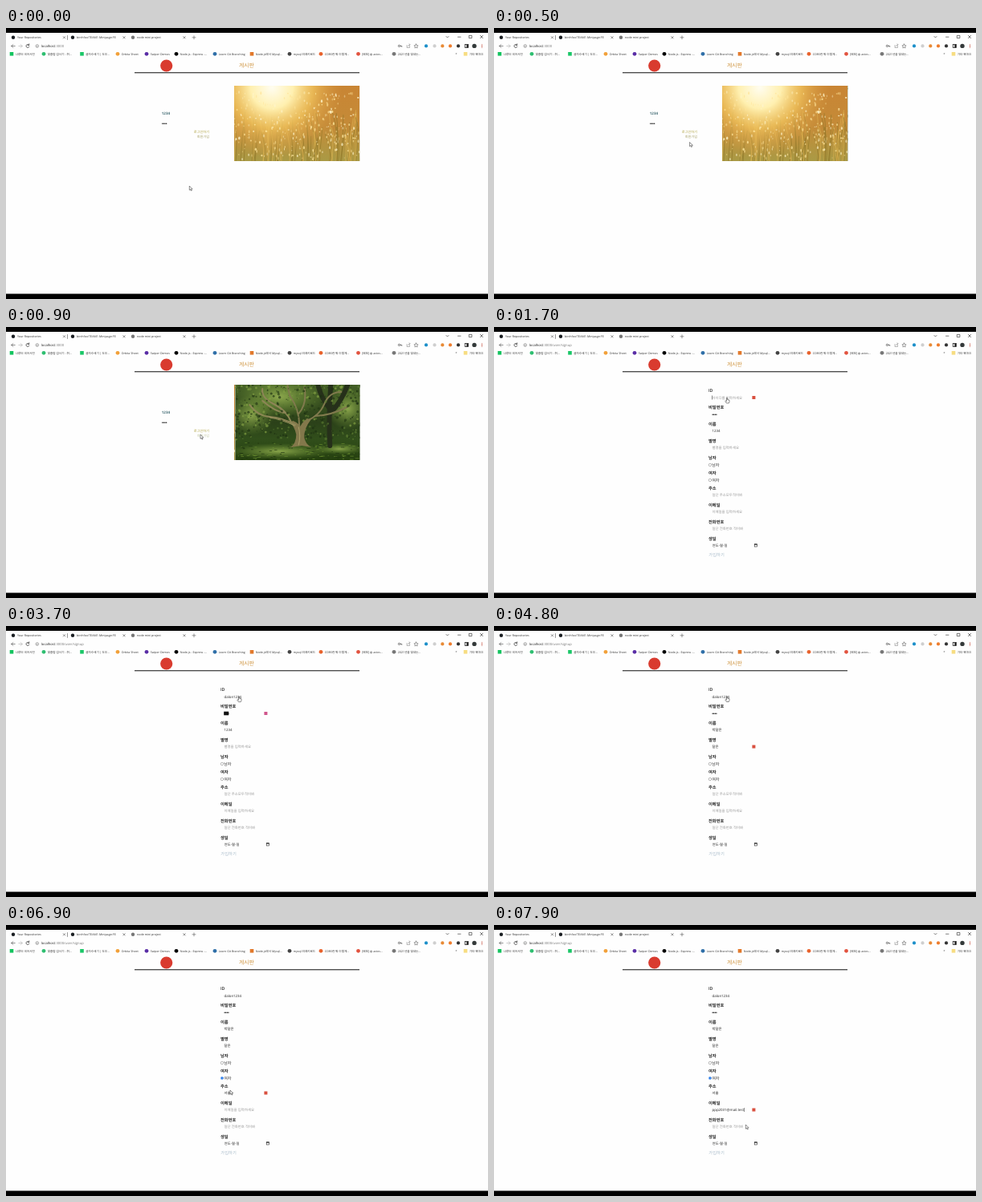
Write an HTML page that moves like this. It is 600 by 338 pixels and loops after 8000 ms.

```html
<!DOCTYPE html>
<html lang="ko">
<head>
<meta charset="utf-8">
<title>Signup demo</title>
<style>
html, body { margin: 0; width: 100%; height: 100%; overflow: hidden; background: #fefefe; }
svg { display: block; width: 100vw; height: 100vh; }
text {
  font-family: "Open Sans", "Noto Sans CJK KR", "Noto Sans CJK", sans-serif;
  text-rendering: geometricPrecision; white-space: pre;
}
</style>
</head>
<body>
<svg id="stage" viewBox="0 0 600 338">
  <defs>
    <clipPath id="frame"><rect x="284" y="72" width="156.5" height="94"/></clipPath>
    <clipPath id="slideClip"><rect width="156.5" height="94"/></clipPath>
    <linearGradient id="field" x2="0" y2="1">
      <stop offset="0" stop-color="#c98534"/><stop offset=".55" stop-color="#c48b38"/>
      <stop offset="1" stop-color="#a99a45"/>
    </linearGradient>
    <radialGradient id="sun" gradientUnits="userSpaceOnUse" cx="47" cy="2" r="88">
      <stop offset="0" stop-color="#fffdf0"/><stop offset=".3" stop-color="#fff0b0"/>
      <stop offset=".58" stop-color="#f4c860" stop-opacity=".75"/>
      <stop offset="1" stop-color="#d89840" stop-opacity="0"/>
    </radialGradient>
    <linearGradient id="forest" x2="0" y2="1">
      <stop offset="0" stop-color="#435e25"/><stop offset=".5" stop-color="#2b4119"/>
      <stop offset=".72" stop-color="#314e1b"/><stop offset="1" stop-color="#25400f"/>
    </linearGradient>
    <radialGradient id="glow">
      <stop offset="0" stop-color="#a8c45c" stop-opacity=".75"/>
      <stop offset="1" stop-color="#7ba03c" stop-opacity="0"/>
    </radialGradient>
  </defs>
</svg>
<script>
const stage = document.getElementById('stage');
const LOOP = 8000;

function add(parent, tag, attrs = {}, content) {
  const node = document.createElementNS(stage.namespaceURI, tag);
  for (const key in attrs) node.setAttribute(key, attrs[key]);
  if (content !== undefined) node.textContent = content;
  parent.append(node);
  return node;
}
const rect = (p, x, y, width, height, fill) => add(p, 'rect', { x, y, width, height, fill });
const dot = (p, cx, cy, r, fill, opacity = 1) => add(p, 'circle', { cx, cy, r, fill, opacity });
const line = (p, d, stroke, width = 0.6) =>
  add(p, 'path', { d, stroke, 'stroke-width': width, fill: 'none', 'stroke-linecap': 'round' });
// y is the vertical middle of the line of text
const label = (p, x, y, size, str, fill = '#222', weight = 400) =>
  add(p, 'text', { x, y: y + size * 0.36, 'font-size': size, fill, 'font-weight': weight }, str);
const show = (node, on) => node.setAttribute('visibility', on ? 'visible' : 'hidden');

function random(seed) {
  return () => (seed = (seed * 16807) % 2147483647) / 2147483647;
}
function at(steps, t) {
  let value = steps[0][1];
  for (const [time, next] of steps) if (t >= time) value = next;
  return value;
}

// Browser window
function buildBrowser() {
  const g = add(stage, 'g');
  rect(g, 0, 0, 600, 338, '#fefefe');
  rect(g, 0, 0, 600, 6, '#000');
  rect(g, 0, 331.5, 600, 6.5, '#000');
  const cross = (x, y, r, color = '#444') =>
    line(g, `M${x - r} ${y - r}l${2 * r} ${2 * r}m0 ${-2 * r}l${-2 * r} ${2 * r}`, color);

  for (const [x, color, title, close] of [
    [9, '#1b1f23', 'Your Repositories', 72.5],
    [83, '#1b1f23', 'birchfox/TEAM1-Minipage-FE', 147],
    [158, '#777', 'node mini project', 222]
  ]) {
    dot(g, x, 11.8, 2.2, color);
    label(g, x + 5, 12, 3.65, title, '#333');
    cross(close, 11.8, 1.2);
  }
  line(g, 'M76.5 9.5v5M232 11.8h4M234 9.8v4', '#555');
  line(g, 'M548 10.5l1.5 1.5 1.5-1.5M562.5 11.2h3.5M576.7 9.4h3.2v3.2h-3.2z', '#222');
  cross(592, 11, 1.6, '#222');

  line(g, 'M11.2 22.5H6.8m2-2l-2 2 2 2', '#444');
  line(g, 'M15.8 22.5h4.4m-2-2l2 2-2 2', '#aaa');
  line(g, 'M28.6 21.2a2 2 0 1 0 .3 2M28.8 19.8v1.7h-1.7', '#333', 0.7);
  add(g, 'circle', { cx: 38.8, cy: 22.5, r: 1.8, fill: 'none', stroke: '#555', 'stroke-width': 0.5 });
  line(g, 'M38.8 22.3v1', '#555', 0.5);

  add(g, 'circle', { cx: 489.4, cy: 22.4, r: 1.1, fill: 'none', stroke: '#444', 'stroke-width': 0.7 });
  line(g, 'M490.5 22.4h2.2v1', '#444', 0.7);
  line(g, 'M499 21.5v3h3.5v-2M500.5 22.8q.3-2 2.4-2.1m-1-.9l1 .9-1 1', '#777', 0.5);
  line(g, 'M510.5 20l.8 1.7 1.8.2-1.3 1.3.3 1.8-1.6-.9-1.6.9.3-1.8-1.3-1.3 1.8-.2z', '#444', 0.5);
  [[523, '#1c8fc9'], [533.5, '#cfcfcf'], [543.3, '#e88a35'], [553, '#ee7c2c'], [563, '#333'], [583, '#343a3a']]
    .forEach(([x, color]) => dot(g, x, 22.4, x > 580 ? 2.7 : 2.1, color));
  add(g, 'rect', { x: 571.3, y: 20.5, width: 4, height: 4, fill: 'none', stroke: '#222', 'stroke-width': 0.8 });
  rect(g, 573.3, 20.5, 2, 4, '#222');
  [20.7, 22.4, 24.1].forEach(y => dot(g, 592.5, y, 0.55, '#c34a3a'));

  for (const [x, color, title, square] of [
    [7, '#14c45f', '나루터 국어사전', 1], [47, '#2fbf71', '맞춤법 검사기 - 취...'],
    [94.5, '#1bc768', '글자수세기 | 도우...', 1], [139, '#f2a13a', 'Orbita Sheet'],
    [175, '#5a2ea6', 'Swiper Demos'], [212, '#000', 'Node.js - Express -...'],
    [260, '#2f6fa8', 'Learn Git Branching'], [306, '#e2792b', 'Node.js에서 Mysql...', 1],
    [353, '#444', 'mysql 외래키로드'], [392, '#e8622c', 'CORS란 뭐 이렇게...'],
    [438.5, '#e2533f', '[배포] ◍ axios...'], [483, '#777', '2021년을 빛내는...'],
    [572, '#f7dd82', '기타 북마크', 1]
  ]) {
    if (square) rect(g, x - 2.3, 30, 4.6, 4.6, color);
    else dot(g, x, 32.3, 2.4, color);
    label(g, x + 4.7, 32.4, 3.6, title, '#333');
  }
  label(g, 559.5, 32, 4, '»', '#333');

  dot(g, 199.7, 47, 7.6, '#d93b2f');
  label(g, 290, 46.5, 6.8, '게시판', '#cf9540');
  rect(g, 160, 55.2, 280, 1.1, '#222');
}

// Sunlit grass
function buildMeadow(g) {
  const rnd = random(71);
  rect(g, 0, 0, 156.5, 94, 'url(#field)');
  for (let i = 0; i < 75; i++) {
    const x = rnd() * 157, y = 30 + rnd() * 40;
    add(line(g, `M${x} 94Q${x + 2} ${y + 25} ${x + rnd() * 14 - 7} ${y}`,
      rnd() < 0.5 ? '#8d7428' : '#e0b653', 0.6), 'title').remove();
  }
  rect(g, 0, 0, 156.5, 94, 'url(#sun)');
  for (let i = 0; i < 330; i++) {
    const x = rnd() * 157, y = 8 + rnd() * 84;
    add(g, 'ellipse', {
      cx: x, cy: y, rx: 0.4 + rnd() * 0.8, ry: 0.6 + rnd() * 1.5,
      fill: rnd() < 0.6 ? '#ffe59a' : '#fff6cf', opacity: 0.3 + rnd() * 0.55
    });
  }
}

// Old tree in a forest
function buildForest(g) {
  const rnd = random(29);
  rect(g, 0, 0, 156.5, 94, 'url(#forest)');
  const glow = (cx, cy, rx, ry) => add(g, 'ellipse', { cx, cy, rx, ry, fill: 'url(#glow)' });
  glow(55, 15, 55, 26);
  glow(20, 38, 28, 25);
  glow(140, 30, 26, 26);
  const leaves = count => {
    for (let i = 0; i < count; i++) {
      const y = rnd() ** 1.3 * 68;
      dot(g, rnd() * 157, y, 0.5 + rnd() * 1.3,
        ['#1d3011', '#85a344', '#587830', '#243a14'][Math.floor(rnd() * 4)], 0.65);
    }
  };
  leaves(420);
  glow(55, 83, 65, 10);
  glow(130, 80, 32, 7);
  for (let i = 0; i < 130; i++)
    rect(g, rnd() * 157, 72 + rnd() * 22, 1 + rnd() * 4, 0.6, rnd() < 0.5 ? '#6c9131' : '#1c310e');
  line(g, 'M118 76Q116 45 119 0M119 35Q133 20 140 0M118 30Q107 17 103 0', '#26301a', 6);
  add(g, 'path', {
    d: 'M69 78Q76 73 76 62Q74 52 68 47L72 45Q79 48 81 52Q84 46 90 42L94 44Q86 54 86 65Q87 74 95 78L83 76Z',
    fill: '#83784b'
  });
  line(g, 'M75 50Q58 41 43 40T18 25M70 47Q64 32 48 24T34 5M62 35Q50 34 34 20', '#8d8556', 2);
  line(g, 'M80 52Q80 30 68 14L65 0M79 36Q90 24 86 2M87 46Q105 39 111 24T132 9M100 39Q120 38 139 28', '#807a4d', 2);
  line(g, 'M79 75Q82 64 79 53M74 51Q57 43 43 41', '#b3a66e', 0.8);
  leaves(90);
}

function buildHome() {
  const g = add(stage, 'g');
  label(g, 193.8, 106, 4.5, '1234', '#174a55', 600);
  for (let i = 0; i < 4; i++) dot(g, 194.8 + i * 1.6, 119.3, 0.75, '#222');
  label(g, 233.8, 129, 4.2, '로그인하기', '#b1a445');
  const join = label(g, 237.7, 135, 4.2, '회원가입');
  const frame = add(g, 'g', { 'clip-path': 'url(#frame)' });
  const slides = [buildMeadow, buildForest].map(build => {
    const slide = add(frame, 'g', { 'clip-path': 'url(#slideClip)' });
    build(slide);
    return slide;
  });
  return { g, join, slides };
}

const FIELDS = {
  id: { y: 88, hint: '아이디를 입력하세요', steps: [[2500, 'dal'], [2600, 'dalo'], [2700, 'dalon'], [3400, 'dalon12'], [3500, 'dalon1234']] },
  name: { y: 129.3, hint: '', steps: [[0, '1234'], [4400, '박'], [4500, '박달'], [4600, '박달온']] },
  nick: { y: 150.5, hint: '별명을 입력하세요', steps: [[4700, '달'], [4800, '달온']] },
  address: { y: 209.5, hint: '일단 주소모두적어봐', steps: [[6500, '서'], [6700, '서울']] },
  email: { y: 230.5, hint: '이메일을 입력하세요', steps: [[7300, 'ppp'], [7400, 'ppp2031'], [7500, 'ppp2031@ma'], [7600, 'ppp2031@mail.'], [7700, 'ppp2031@mail.test']] },
  phone: { y: 251.5, hint: '일단 전화번호 적어봐', steps: [] }
};
// Row of the badge beside the focused input
const FOCUS = [[0, 109], [1700, 88], [3700, 109], [4200, 129.3], [4700, 150.5], [5300, 129.3], [6000, 0], [6300, 209.5], [7100, 230.5]];

function buildForm() {
  const g = add(stage, 'g');
  ['ID', '비밀번호', '이름', '별명', '남자', '여자', '주소', '이메일', '전화번호', '생일']
    .forEach((title, i) => label(g, 267, [79, 100, 121, 142, 163, 182, 201, 222, 243, 264][i], 5.25, title, '#222', 600));
  for (const field of Object.values(FIELDS)) field.node = label(g, 271.5, field.y, 4.4, '');
  const dots = [0, 1, 2, 3].map(i => dot(g, 272.2 + i * 1.55, 109.2, 0.72, '#222'));
  const selection = rect(g, 271.2, 106.7, 6, 4.6, '#111');
  const radio = y => {
    label(g, 271.2, y, 5.1, y < 180 ? '남자' : '여자', '#333');
    return add(g, 'circle', { cx: 268.9, cy: y, r: 1.7, fill: '#fff', stroke: '#777', 'stroke-width': 0.5 });
  };
  radio(172);
  const female = radio(191);
  const mark = dot(g, 268.9, 191, 1.15, '#1a73e8');
  label(g, 271.8, 272.5, 4.3, '연도-월-일', '#222', 500);
  add(g, 'rect', { x: 324.2, y: 271, width: 3.2, height: 3, fill: 'none', stroke: '#222', 'stroke-width': 0.6 });
  rect(g, 324, 270.5, 3.6, 1.1, '#222');
  label(g, 267.3, 284, 5.3, '가입하기', '#a9bccb');
  const badge = rect(g, 321.4, 0, 4, 4, '#d9503f');
  const caret = rect(g, 0, 0, 0.5, 5, '#222');
  return { g, dots, selection, female, mark, badge, caret };
}

function drawForm(t) {
  for (const field of Object.values(FIELDS)) {
    const value = field.steps.length && t >= field.steps[0][0] ? at(field.steps, t) : '';
    field.node.textContent = value || field.hint;
    field.node.setAttribute('fill', value ? '#222' : '#999');
    field.width = value ? field.node.getComputedTextLength() : 0;
  }
  const count = at([[0, 4], [3800, 1], [3900, 2], [4000, 4]], t);
  form.dots.forEach((node, i) => show(node, form.g.isOn && i < count));
  show(form.selection, form.g.isOn && t >= 3700 && t < 3800);

  const picked = t >= 6000;
  form.female.setAttribute('stroke', picked ? '#1a73e8' : '#777');
  show(form.mark, form.g.isOn && picked);

  const row = at(FOCUS, t);
  show(form.badge, form.g.isOn && row > 0);
  form.badge.setAttribute('y', row - 2);
  form.badge.setAttribute('fill', row === 109 ? '#d0568c' : '#d9503f');

  const active = t >= 7100 ? FIELDS.email : FIELDS.id;
  show(form.caret, form.g.isOn && (t >= 7100 || (t >= 1700 && t < 2500)));
  form.caret.setAttribute('x', 271.4 + active.width);
  form.caret.setAttribute('y', active.y - 2.5);
}

// time, x, y of the pointer tip
const PATH = [
  [0, 228.3, 197], [100, 228.3, 197], [600, 245.3, 136.3], [700, 245.3, 136.3], [900, 242, 134.2],
  [1000, 242, 134.2], [1400, 290, 88], [5000, 290, 87.5], [5300, 289, 129], [5700, 270, 190],
  [6000, 270, 190], [6300, 279, 206], [7300, 279, 206], [7900, 313.3, 249]
];
const HAND = [[0, 0], [600, 1], [800, 0], [1400, 1], [5200, 0]];

function pointerAt(t) {
  const next = PATH.findIndex(([time]) => time > t);
  if (next < 0) return PATH.at(-1).slice(1);
  const [t0, x0, y0] = PATH[next - 1], [t1, x1, y1] = PATH[next];
  const u = (t - t0) / (t1 - t0), k = u * u * (3 - 2 * u);
  return [x0 + (x1 - x0) * k, y0 + (y1 - y0) * k];
}

// Default CSS "ease": solve the curve for x, then read y
function ease(x) {
  if (x <= 0 || x >= 1) return x <= 0 ? 0 : 1;
  const bezier = (a, b, s) => 3 * a * s * (1 - s) ** 2 + 3 * b * s * s * (1 - s) + s ** 3;
  let lo = 0, hi = 1;
  for (let i = 0; i < 20; i++) {
    const mid = (lo + hi) / 2;
    if (bezier(0.25, 0.25, mid) < x) lo = mid; else hi = mid;
  }
  return bezier(0.1, 1, lo);
}

buildBrowser();
const home = buildHome();
const form = buildForm();
const cursor = add(stage, 'g');
const shape = d => add(cursor, 'path', { d, fill: '#fff', stroke: '#333', 'stroke-width': 0.55, 'stroke-linejoin': 'round' });
const arrow = shape('M0 0V5.2L1.2 4.1 2 6 3 5.6 2.2 3.8H3.8Z');
const hand = shape('M-.5 .3Q0-.4 .5 .3V2.6L3 3.2V5.2L2.3 7H-.6L-2.2 4.4-1.5 3.8-.5 4.7Z');

function draw(t) {
  const signup = t >= 1100;
  form.g.isOn = signup;
  show(home.g, !signup);
  show(form.g, signup);
  url.port.textContent = signup ? ':3000/user/signup' : ':3000';

  home.join.setAttribute('fill', at([[0, '#aaa56c'], [600, '#a3a43f'], [800, '#c6cba6']], t));
  const shift = ease((t - 500) / 455) * 156.5;
  home.slides.forEach((slide, i) => slide.setAttribute('transform', `translate(${284 + 156.5 * i - shift} 72)`));

  drawForm(t);
  cursor.setAttribute('transform', `translate(${pointerAt(t)})`);
  const pointing = at(HAND, t);
  show(hand, pointing);
  show(arrow, !pointing);
}

const address = label(stage, 43.8, 22.5, 4.2, '', '#222');
const url = {
  host: add(address, 'tspan', {}, 'localhost'),
  port: add(address, 'tspan', { fill: '#777' })
};

const start = performance.now();
function tick() {
  draw((performance.now() - start) % LOOP);
  requestAnimationFrame(tick);
}
tick();
</script>
</body>
</html>
```
